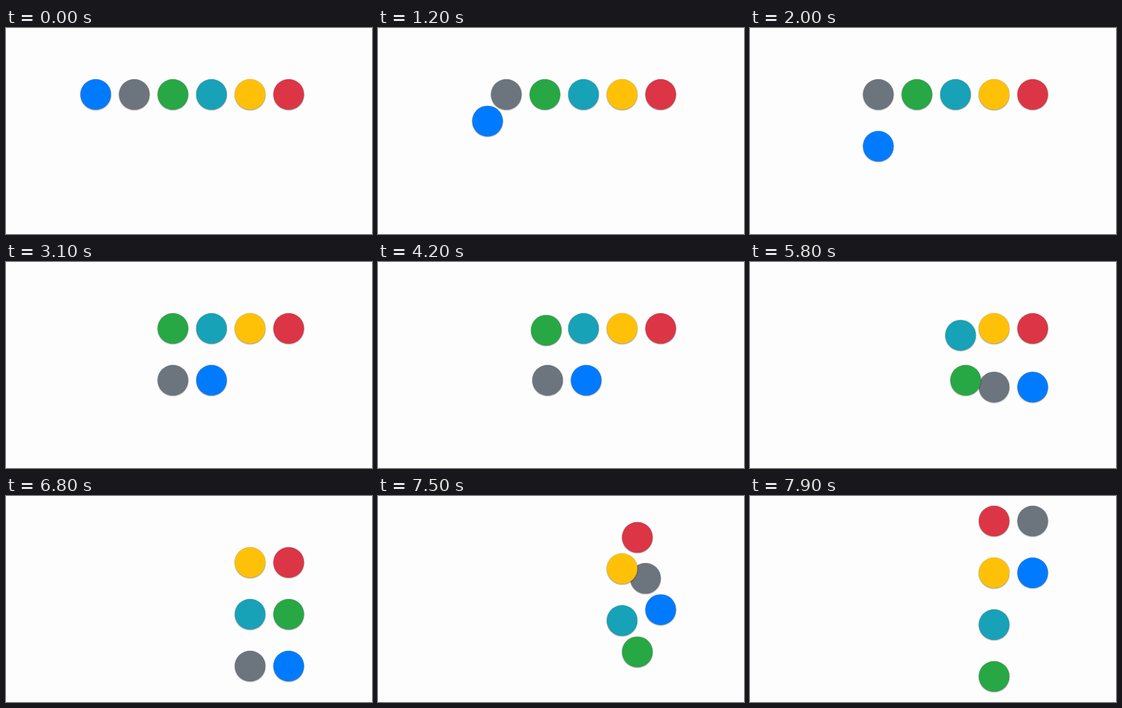
These frames come from a looping animation (600 by 338 pixels, 8000 ms). An HTML page:

```html
<!DOCTYPE html>
<html lang="en">
<head>
<meta charset="utf-8">
<title>Reflowing dots</title>
<style>
  html, body {
    margin: 0;
    width: 100%;
    height: 100%;
    overflow: hidden;
    background: #fefdfe;
  }
  .dot {
    position: absolute;
    left: -24.75px;
    top: -24.75px;
    width: 49.5px;
    height: 49.5px;
    border-radius: 50%;
    box-shadow: 0 1px 2px rgba(0, 0, 0, .4), 0 0 1px rgba(0, 0, 0, .4);
  }
</style>
</head>
<body>
<script>
  const LOOP = 8000, STEP = 100, MOVE = 500;

  // Later dots lie on top.
  const COLORS = {
    b: '#007bff', s: '#6c757d', g: '#28a745',
    t: '#17a2b8', y: '#ffc107', r: '#dc3545'
  };

  // Each layout lists its rows of dots; top is its first row in grid units.
  const LAYOUTS = [
    { start: 0, rows: ['bsgtyr'] },
    { start: 1050, rows: ['.sgtyr', '.b'] },
    { start: 2585, rows: ['..gtyr', '..sb'] },
    { start: 4174, rows: ['...tyr', '...gsb'] },
    { start: 5739, rows: ['....yr', '....tg', '....sb'] },
    { start: 7325, rows: ['....rs', '....yb', '....t', '....g'], top: -0.8 }
  ];

  function place({ rows, top = 0 }, key) {
    const row = rows.findIndex(r => r.includes(key));
    return [147.1 + 63.27 * rows[row].indexOf(key), 109 + 85 * (row + top)];
  }

  const dots = Object.entries(COLORS).map(([key, color]) => {
    const el = document.createElement('div');
    el.className = 'dot';
    el.style.background = color;
    document.body.append(el);
    return { el, spots: LAYOUTS.map(layout => place(layout, key)) };
  });

  // cubic-bezier(.25, .1, .25, 1), the CSS "ease" curve
  function ease(p) {
    if (p <= 0 || p >= 1) return p <= 0 ? 0 : 1;
    const curve = (a, b, s) =>
      3 * a * s * (1 - s) ** 2 + 3 * b * s * s * (1 - s) + s ** 3;
    let lo = 0, hi = 1;
    for (let i = 0; i < 24; i++) {
      const mid = (lo + hi) / 2;
      if (curve(.25, .25, mid) < p) lo = mid; else hi = mid;
    }
    return curve(.1, 1, lo);
  }

  function draw(now) {
    // The motion is sampled ten times a second.
    const t = Math.floor((now % LOOP) / STEP) * STEP;
    const to = LAYOUTS.findLastIndex(layout => layout.start <= t);
    const from = Math.max(to - 1, 0);
    const k = ease((t - LAYOUTS[to].start) / MOVE);
    for (const { el, spots } of dots) {
      const [x, y] = spots[from].map((v, i) => v + (spots[to][i] - v) * k);
      el.style.transform = `translate(${x}px, ${y}px)`;
    }
  }

  let origin;
  function tick(now) {
    origin ??= now;
    draw(now - origin);
    requestAnimationFrame(tick);
  }
  draw(0);
  requestAnimationFrame(tick);
</script>
</body>
</html>
```
